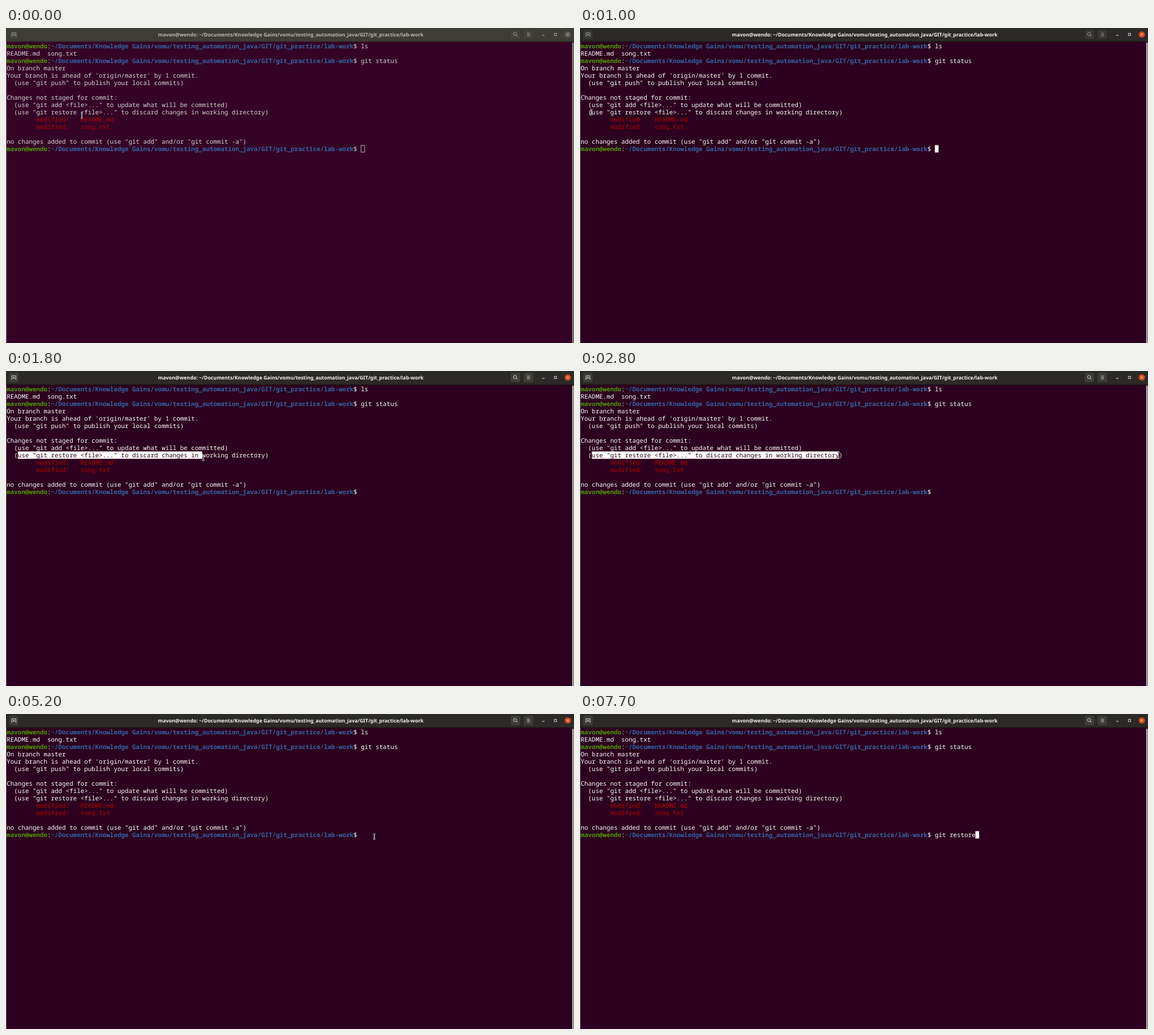
Recreate the animation shown at these times as an HTML page with a canvas. Size 1004x558 px, loop 8 s.

```html
<!DOCTYPE html>
<html lang="en">
<head>
<meta charset="utf-8">
<title>Terminal</title>
<style>
  html, body { margin: 0; width: 100%; height: 100%; overflow: hidden; background: #2c001e; }
  canvas { display: block; }
</style>
</head>
<body>
<canvas id="stage" width="1004" height="558"></canvas>
<script>
const ctx = document.getElementById('stage').getContext('2d');
const LOOP = 8000, STEP = 100;
const CELL = 6.52, ROW = 13, LEFT = 1.3, TOP = 25.5;
const FOCUS = 1000, SELECT = 1100, CLEAR = 3500, TYPE = 5400;
const GREEN = '#4e9a06', BLUE = '#3465a4', RED = '#b40000';

const user = 'mavon@wendo';
const path = '~/Documents/Knowledge Gains/vomu/testing_automation_java/GIT/git_practice/lab-work';
const prompt = cmd => [[user, GREEN, 1], [':'], [path, BLUE, 1], ['$ ' + cmd]];
const plain = s => [[s]];
const file = name => [['        '], ['modified:   ' + name, RED]];

const lines = [
  prompt('ls'),
  plain('README.md  song.txt'),
  prompt('git status'),
  plain('On branch master'),
  plain("Your branch is ahead of 'origin/master' by 1 commit."),
  plain('  (use "git push" to publish your local commits)'),
  [],
  plain('Changes not staged for commit:'),
  plain('  (use "git add <file>..." to update what will be committed)'),
  plain('  (use "git restore <file>..." to discard changes in working directory)'),
  file('README.md'),
  file('song.txt'),
  [],
  plain('no changes added to commit (use "git add" and/or "git commit -a")'),
  prompt('')
];
const LAST = lines.length - 1;
const PROMPT_LEN = user.length + path.length + 3;

const typed = 'git restore';
const keyTimes = [5400, 5700, 5900, 6100, 6400, 6700, 6900, 7200, 7400, 7600, 7700];

// Pointer path: time, x, y
const pointer = [
  [0, 134, 155], [200, 34, 143], [400, 34, 143], [900, 20, 149], [1100, 20, 149],
  [1300, 95, 153], [1500, 219, 158], [1700, 318, 155], [2000, 410, 151],
  [2200, 436, 149], [2600, 457, 149], [3100, 457, 149], [3300, 620, 200],
  [3400, 696, 220], [3500, 662, 218], [3600, 651, 217], [8000, 651, 217]
];

function pointerAt(t) {
  const i = pointer.findIndex(p => p[0] > t);
  const [t0, x0, y0] = pointer[i - 1], [t1, x1, y1] = pointer[i];
  const k = (t - t0) / (t1 - t0);
  return [x0 + (x1 - x0) * k, y0 + (y1 - y0) * k];
}

const colX = c => LEFT + c * CELL;
const rowY = r => TOP + r * ROW;
const lineLen = r => lines[r].reduce((n, run) => n + run[0].length, 0);

function box(x, y, w, h, color) {
  ctx.fillStyle = color;
  ctx.fillRect(x, y, w, h);
}

function stroke(d, color, width) {
  ctx.strokeStyle = color;
  ctx.lineWidth = width;
  ctx.stroke(new Path2D(d));
}

function glyph(ch, col, row, color, bold) {
  ctx.font = (bold ? 'bold ' : '') + '10.87px "Noto Sans Mono", monospace';
  ctx.fillStyle = color;
  ctx.fillText(ch, colX(col), rowY(row) + 10.3);
}

// Selected column range per row, from the drag anchor to the pointer
function selection(t) {
  if (t < SELECT || t >= CLEAR) return {};
  const [x, y] = pointerAt(t);
  const row = y >= rowY(10) ? 10 : 9;
  const col = Math.round((x - LEFT) / CELL);
  const end = col >= lineLen(row) ? Infinity : col;
  return row === 9 ? { 9: [3, end] } : { 9: [3, Infinity], 10: [0, end] };
}

function drawLines(t, fg, bg) {
  const sel = selection(t);
  lines.forEach((runs, r) => {
    const [from, to] = sel[r] || [0, 0];
    if (to > from) {
      const right = to === Infinity ? 998.5 : colX(to);
      box(colX(from), rowY(r), right - colX(from), ROW, '#fff');
    }
    let c = 0;
    for (const [text, color = fg, bold] of runs) {
      for (const ch of text) {
        const on = c >= from && c < to;
        if (on && color !== fg) box(colX(c), rowY(r), CELL + 0.3, ROW, color);
        glyph(ch, c++, r, on ? bg : color, bold);
      }
    }
  });
}

function drawCursor(t, fg) {
  const n = keyTimes.filter(k => k <= t).length;
  [...typed.slice(0, n)].forEach((ch, i) => glyph(ch, PROMPT_LEN + i, LAST, fg));
  const x = colX(PROMPT_LEN + n), y = rowY(LAST);
  if (t < FOCUS) {
    ctx.strokeStyle = fg;
    ctx.lineWidth = 0.8;
    ctx.strokeRect(x + 0.3, y + 0.5, CELL - 0.1, ROW - 1);
  } else if (t >= TYPE || Math.floor((t - FOCUS) / 600) % 2 === 0) {
    box(x, y, CELL, ROW, '#fff');
  }
}

function drawPointer(t) {
  if (t >= TYPE) return;
  const [x, y] = pointerAt(t);
  const d = `M${x - 2} ${y - 4.5}h4M${x} ${y - 4.5}v9M${x - 2} ${y + 4.5}h4`;
  stroke(d, '#eee', 2);
  stroke(d, '#2a2a2a', 0.8);
}

function button(x, fill, edge) {
  ctx.beginPath();
  ctx.roundRect(x, 2.5, 18, 18, 2.5);
  ctx.fillStyle = fill;
  ctx.fill();
  ctx.strokeStyle = edge;
  ctx.lineWidth = 0.7;
  ctx.stroke();
}

function drawTitleBar(t) {
  const on = t >= FOCUS, done = t > FOCUS;
  const ink = on ? '#f4f3f0' : '#b9b7b1';
  const icon = done ? '#e8e7e3' : '#aaa8a2';
  box(0, 0, 1004, 24, on ? '#2b2a26' : '#3d3c37');
  box(0, 23.5, 1004, 1, on ? '#1c1b18' : '#302f2b');
  for (const x of [5, 891.5, 914.5]) {
    button(x, done ? '#3d3c37' : on ? '#373632' : '#42413c', on ? '#22211e' : '#35342f');
  }
  stroke('M10.5 14.5v-6h7v6M9.5 14.5h2M16.5 14.5h2M14 10v4M12 12h4', icon, 0.9);
  stroke('M902.6 10.7a2.8 2.8 0 1 1-5.6 0a2.8 2.8 0 1 1 5.6 0M901.9 12.8l2.4 2.4', icon, 0.9);
  stroke('M920.8 9h5.4M920.8 11.5h5.4M920.8 14h5.4', icon, 0.8);
  stroke('M947.5 13h4.5M969.3 9.4h4v4h-4z', ink, 0.9);
  ctx.beginPath();
  ctx.arc(993, 11.5, 5.5, 0, 7);
  ctx.fillStyle = on ? '#d9481f' : '#5d5b55';
  ctx.fill();
  stroke('M991.2 9.7l3.6 3.6M994.8 9.7l-3.6 3.6', ink, 0.9);
  ctx.font = 'bold 8.85px "Noto Sans", sans-serif';
  ctx.fillStyle = ink;
  ctx.textAlign = 'center';
  ctx.fillText(user + ': ' + path, 503.2, 14.7);
  ctx.textAlign = 'left';
}

function draw(t) {
  const on = t >= FOCUS;
  const bg = on ? '#2c001e' : '#350326';
  const fg = on ? '#fff' : '#d6d3d5';
  ctx.textRendering = 'geometricPrecision';
  box(0, 0, 1004, 558, bg);
  drawLines(t, fg, bg);
  drawCursor(t, fg);
  box(0, 24, 1, 534, on ? '#75656f' : '#85767f');
  box(1000, 24.5, 4, 534, on ? '#42303b' : '#49333f');
  box(1001, 26.5, 2.4, 532, on ? '#b9b4b5' : '#8d8287');
  drawTitleBar(t);
  drawPointer(t);
}

const start = performance.now();
let shown = -1;
function tick() {
  const t = Math.floor((performance.now() - start) % LOOP / STEP) * STEP;
  if (t !== shown) draw(shown = t);
  requestAnimationFrame(tick);
}
tick();
</script>
</body>
</html>
```
